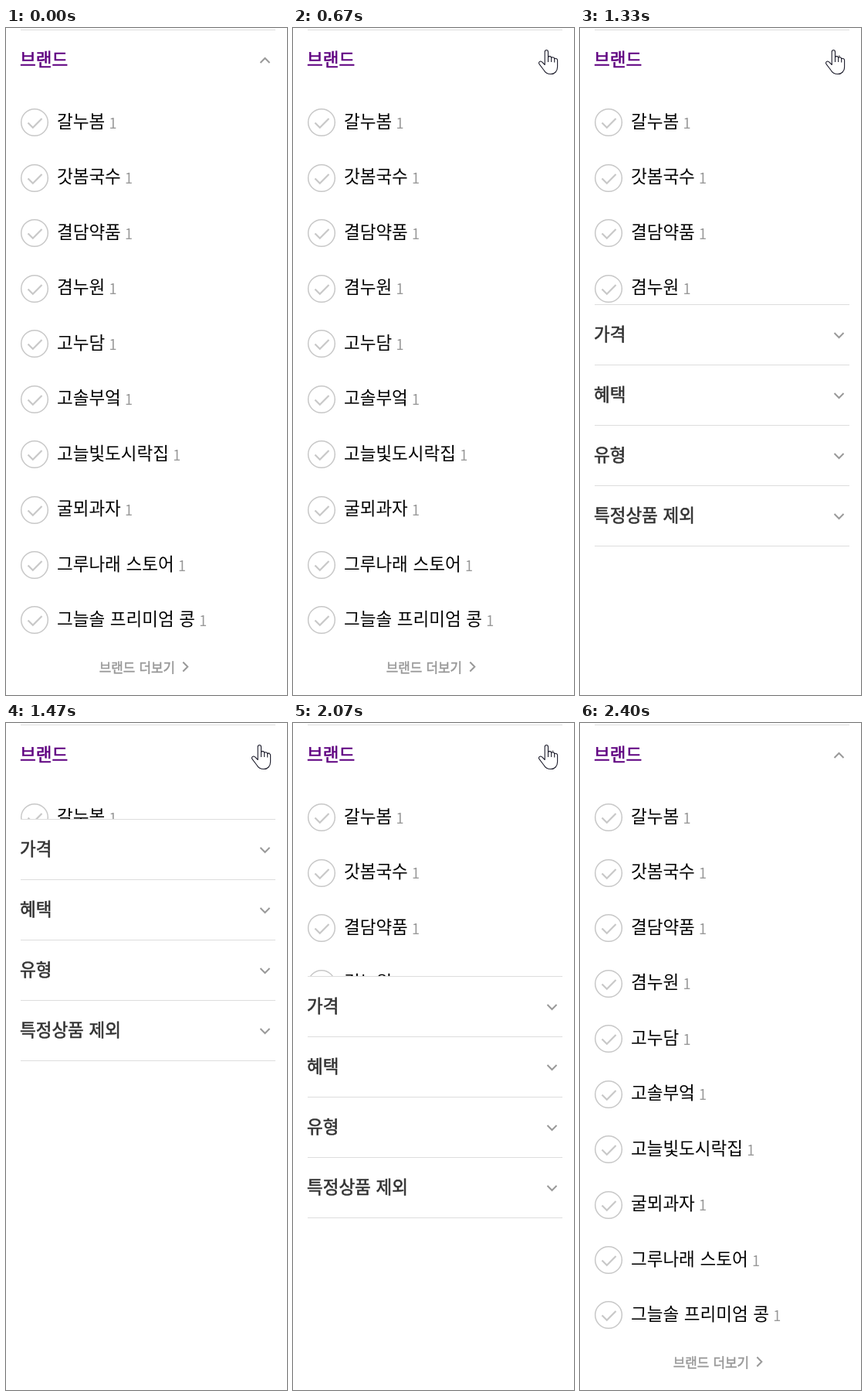
Write an HTML page that moves like this. It is 364 px wide and 862 px high and loops after 3140 ms.

```html
<!DOCTYPE html>
<html lang="ko">
<head>
<meta charset="utf-8">
<title>필터 목록</title>
<style>
  html, body { margin: 0; width: 100%; height: 100%; overflow: hidden; background: #fff; }
  svg { display: block; font-family: "Noto Sans CJK KR", "Noto Sans KR", "Noto Sans CJK", sans-serif; }
  text { font-size: 22.5px; word-spacing: 0.4px; }
  /* a thin outline gives the medium weight */
  .head { fill: #333; stroke: #333; stroke-width: 0.6; }
  .brand { fill: #5f0080; stroke: #5f0080; }
  .count { font-size: 18px; fill: #999; }
  .more { font-size: 16.9px; fill: #999; stroke: #999; stroke-width: 0.5; }
  .rule { stroke: #ddd; }
  .chevron { fill: none; stroke: #999; stroke-width: 2; }
  .check { fill: none; stroke: #c8c8c8; }
  .hand { fill: #fff; stroke: #1c1c2b; stroke-width: 1.1; stroke-linejoin: round; }
</style>
</head>
<body>
<svg width="364" height="862" viewBox="0 0 364 862">
  <g id="rows"></g>
  <text class="more" x="120.7" y="833">브랜드 더보기</text>
  <path class="chevron" d="M229.3 819.5l6 6-6 6"/>
  <g id="panel"><rect width="364" height="862" fill="#fff"/></g>
  <path class="rule" d="M19 2.5H349"/>
  <text class="head brand" x="18" y="48.5">브랜드</text>
  <path id="arrow" class="chevron" d="M-6 3l6-6 6 6"/>
  <g id="hand" class="hand">
    <path d="M326.2 47.5V31.2c0-3.6 4.3-3.6 4.3 0V37.6c.8-1.6 4.2-1.3 4.2 1c1.2-1.4 4-.8 4 1.2c1-1 3.9-.6 3.9 2V50c0 6-3.6 9.5-8.6 9.5c-5 0-7.5-2-9-5l-6-7.8c-1.6-2.4 1-5 3.6-2.8z"/>
    <path fill="none" d="M330.5 37v7M334.7 38.4v5.6M338.7 39.6v5"/>
  </g>
</svg>
<script>
const LOOP = 3140, STEP = 200 / 3;
const OPEN = 865, CLOSED = 81, PITCH = 78;
const $ = id => document.getElementById(id);

const brands = ["갈누봄", "갓봄국수", "결담약품", "겸누원", "고누담", "고솔부엌",
  "고늘빛도시락집", "굴뫼과자", "그루나래 스토어", "그늘솔 프리미엄 콩"];
const sections = ["가격", "혜택", "유형", "특정상품 제외"];

$("rows").innerHTML = brands.map((name, i) => {
  const y = 122.25 + 71.47 * i, base = Math.floor(y) + 7;
  return `<g transform="translate(37 ${Math.round(y)})">
    <circle class="check" r="17.3" stroke-width="1.5"/>
    <path class="check" d="M-8.5 0.5l6.3 6.3 11.7-11.8" stroke-width="2.2"/></g>
    <text x="66" y="${base}">${name}<tspan class="count" dx="5.3" dy="1">1</tspan></text>`;
}).join("");

const rule = y => `<path class="rule" d="M19 ${y + 0.5}H349"/>`;
$("panel").innerHTML += sections.map((name, i) => {
  const y = PITCH * i;
  return rule(y) + `<text class="head" x="18" y="${y + 46.5}">${name}</text>
    <path class="chevron" d="M329.5 ${y + 37}l6 6 6-6"/>`;
}).join("") + rule(PITCH * sections.length);

// cubic-bezier(.25, .1, .25, 1)
function ease(x) {
  if (x <= 0) return 0;
  if (x >= 1) return 1;
  const curve = (s, a, b) => 3 * (1 - s) ** 2 * s * a + 3 * (1 - s) * s * s * b + s ** 3;
  let lo = 0, hi = 1;
  for (let i = 0; i < 30; i++) {
    const mid = (lo + hi) / 2;
    if (curve(mid, 0.25, 0.25) < x) lo = mid; else hi = mid;
  }
  return curve(lo, 0.1, 1);
}

function draw(time) {
  // motion advances at 15 steps per second
  const step = Math.floor((time + 4) / STEP), t = step * STEP;
  const folded = t < 1980 ? ease((t - 1182.5) / 400)
    : step < 31 ? 1 : 1 - ease((t - 1993.9) / 350);
  const edge = Math.round(OPEN + (CLOSED - OPEN) * folded);
  $("panel").setAttribute("transform", `translate(0 ${edge})`);
  $("arrow").setAttribute("transform", `translate(335.5 42) rotate(${180 * folded})`);

  const away = Math.max(0, 10 - step) / 2;
  const slide = away * away;
  $("hand").setAttribute("transform", `translate(${11 * slide} ${-4 * slide})`);
  $("hand").style.display = step >= 8 && step < 36 ? "" : "none";
}

function tick() {
  draw(performance.now() % LOOP);
  requestAnimationFrame(tick);
}
tick();
</script>
</body>
</html>
```
